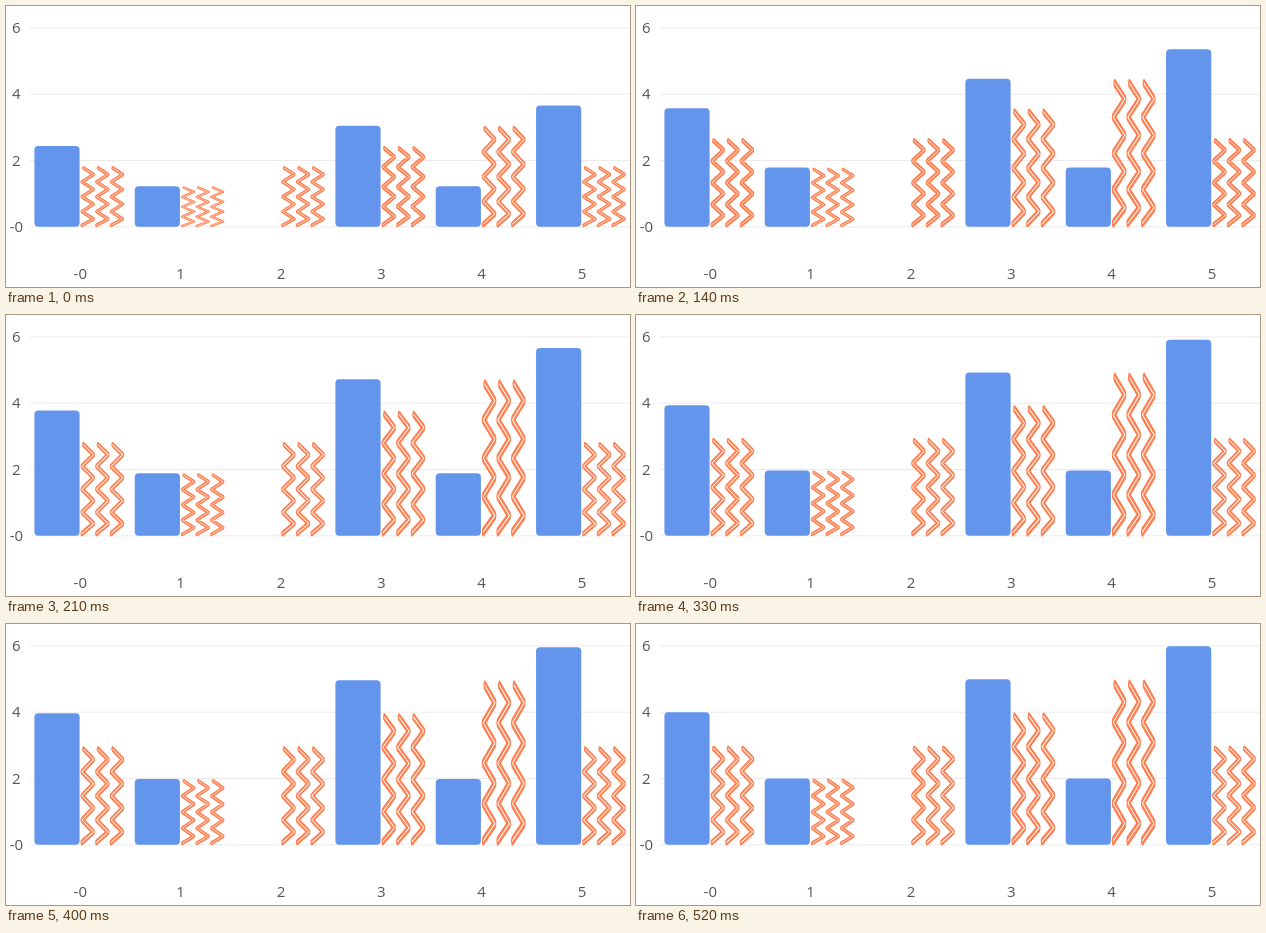
Write an HTML page that moves like this. It is 624 px wide and 281 px high and loops after 590 ms.

```html
<!DOCTYPE html>
<html lang="en">
<head>
<meta charset="utf-8">
<title>Column chart</title>
<style>
  html, body { margin: 0; width: 100%; height: 100%; overflow: hidden; background: #fff; }
  svg { display: block; width: 624px; height: 281px; }
  text { font: 15px "Open Sans", "Noto Sans", sans-serif; fill: #555; text-anchor: middle; }
  .grid { stroke: #ebebeb; stroke-width: 1; }
  .column { fill: #6495ed; }
  .zigzag { fill: none; stroke-linecap: round; stroke-linejoin: round; }
</style>
</head>
<body>
<svg id="chart" viewBox="0 0 624 281"></svg>
<script>
const chart = document.getElementById("chart");
const BASE = 220.8, UNIT = 33.15;      // y of zero, pixels per value
const CENTER = 73.9, PITCH = 100.33;   // middle of the first category, category spacing
const WIDTH = 45.2;
const columns = [4, 2, null, 5, 2, 6];
const zigzags = [3, 2, 3, 4, 5, 3];

function add(tag, attributes, parent = chart) {
  const node = document.createElementNS("http://www.w3.org/2000/svg", tag);
  for (const name in attributes) node.setAttribute(name, attributes[name]);
  return parent.appendChild(node);
}

function label(text, x, y) {
  add("text", { x, y }).textContent = text;
}

// Three zigzag strips in a WIDTH x WIDTH box, with its bottom left corner at 0,0.
function zigzagPath() {
  const left = 2, right = 13.7, firstTurn = -39, rise = 5.53;
  let d = "";
  for (let strip = 0; strip < 3; strip++) {
    const x = strip * 14.6;
    d += `M${x + 3.6} -43.8`;
    for (let turn = 0; turn < 7; turn++) {
      d += `L${x + (turn % 2 ? left : right)} ${firstTurn + turn * rise}`;
    }
    d += `L${x + left} -1.1`;
  }
  return d;
}

for (const value of [0, 2, 4, 6]) {
  const y = BASE - value * UNIT;
  add("line", { class: "grid", x1: 24, x2: 624, y1: y, y2: y });
  label(value || "-0", 10.4, y + 5.2);
}
columns.forEach((_, i) => label(i || "-0", 74.3 + i * PITCH, 272.8));

const bars = [];
const d = zigzagPath();
columns.forEach((value, i) => {
  const x = CENTER + i * PITCH;
  if (value !== null) {
    const rect = add("rect", { class: "column", x: x - WIDTH - 0.3, width: WIDTH, rx: 4 });
    bars.push(growth => {
      const height = value * UNIT * growth;
      rect.setAttribute("y", BASE - height);
      rect.setAttribute("height", height);
    });
  }
  const group = add("g", { class: "zigzag" });
  add("path", { d, stroke: "#ff7f50", "stroke-width": 2.75 }, group);
  add("path", { d, stroke: "#fff", "stroke-width": 0.5 }, group);
  bars.push(growth => {
    const scale = zigzags[i] * UNIT * growth / WIDTH;
    group.setAttribute("transform", `translate(${x} ${BASE}) scale(1 ${scale})`);
  });
});

// Exponential ease-out, advanced in discrete steps.
const LOOP = 590;
const stepTimes = [0, 70, 140, 210, 260, 330, 400, 470, 520];

function draw(now) {
  const time = now % LOOP;
  const step = stepTimes.filter(start => start <= time).length - 1;
  const growth = 1.001 - 0.391 * 0.525 ** step;
  bars.forEach(update => update(growth));
}

const start = performance.now();
function frame() {
  draw(performance.now() - start);
  requestAnimationFrame(frame);
}
frame();
</script>
</body>
</html>
```
